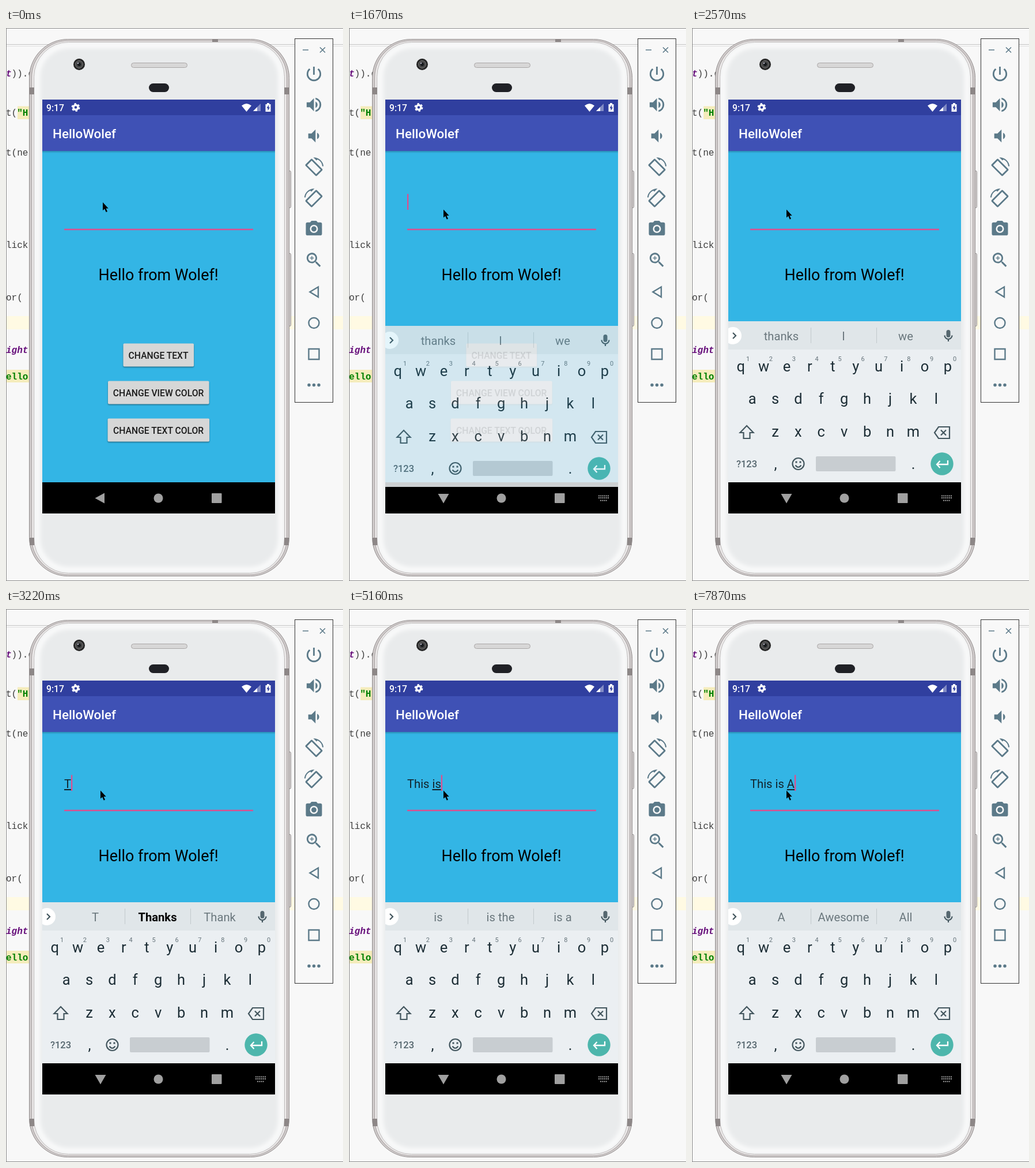
An HTML page for the animation above (8000 ms loop, 585 by 958 pixels).

```html
<!DOCTYPE html>
<html lang="en">
<head>
<meta charset="utf-8">
<style>
  html, body { margin: 0; width: 100%; height: 100%; overflow: hidden; background: #f8f8f8; }
  svg { display: block; }
  text { font-family: Roboto, sans-serif; white-space: pre; }
  .mid { text-anchor: middle; }
  .code text { font: 16px "Liberation Mono", monospace; fill: #3c3c3c; }
  .code .var { font-style: italic; font-weight: bold; fill: #660e7a; }
  .code .str { font-weight: bold; fill: #008000; }
  .caps { font-size: 15.7px; font-weight: 500; fill: #1b1b1b; }
  .key { font-size: 25.5px; fill: #1c2d35; }
  .hint { font-size: 11px; fill: #65737a; }
  .pick { font-size: 20.2px; fill: #6a777d; }
  .pick.best { font-weight: bold; fill: #000; }
  .line { fill: none; stroke: #5c7a89; stroke-width: 2.4; }
  .keyline { fill: none; stroke: #44575f; stroke-width: 2.2; }
  #word { text-decoration: underline; text-decoration-thickness: 1px; text-underline-offset: 2px; }
</style>
</head>
<body>
<svg width="585" height="958" viewBox="0 0 585 958">
  <defs>
    <filter id="glow"><feGaussianBlur stdDeviation="4"/></filter>
    <filter id="soft" x="-10%" y="-10%" width="120%" height="140%"><feGaussianBlur stdDeviation="1.2"/></filter>
    <linearGradient id="shade" x2="0" y2="1">
      <stop stop-opacity=".22"/><stop offset="1" stop-opacity="0"/>
    </linearGradient>
    <clipPath id="screen"><rect x="63" y="124" width="404" height="717"/></clipPath>
  </defs>

  <!-- editor behind the phone -->
  <path d="M0 28.5H585" stroke="#c4c4c4"/>
  <path d="M0 31.5H585" stroke="#e0e0e0"/>
  <path d="M1 499H585V522H1z" fill="#fffae3"/>
  <path d="M20 135.500H45V158H20zM1 592H45V614H1z" fill="#f5ecbb"/>
  <path d="M0 .5H585M.5 0V958M0 957.5H585" stroke="#8c8c8c"/>
  <g class="code">
    <text y="84"><tspan class="var">t</tspan>)).c</text>
    <text y="152">t(<tspan class="str">"H</tspan></text>
    <text y="221">t(ne</text>
    <text y="381">lick</text>
    <text y="472">or(</text>
    <text y="563" class="var">ight</text>
    <text y="609" class="str">ello</text>
  </g>

  <!-- phone -->
  <g fill="#d9d5d5" stroke="#8f8a8a">
    <rect x="489.500" y="247.500" width="5" height="64" rx="2"/>
    <rect x="489.500" y="390.500" width="5" height="126" rx="2"/>
    <rect x="40.500" y="19.500" width="451" height="930" rx="67" fill="#cfcaca"/>
    <rect x="44.500" y="22" width="443" height="925" rx="64" fill="#e8e5e5" stroke="#aaa4a4" stroke-width="1.500"/>
    <rect x="48.500" y="24.500" width="435" height="920" rx="60" fill="#e9ebec" stroke="#989292"/>
  </g>
  <rect x="54" y="30" width="424" height="909" rx="55" fill="none" stroke="#fff" stroke-width="8" filter="url(#glow)"/>
  <path d="M41 103h8v12h-8zM483 103h8v12h-8zM41 883h8v13h-8zM483 883h8v13h-8zM358 19h10v5h-10z" fill="#8d8787"/>
  <circle cx="127" cy="63" r="10" fill="#252525"/>
  <circle cx="127" cy="63" r="6.500" fill="#454545" stroke="#777"/>
  <circle cx="127" cy="63" r="3" fill="#15181b"/>
  <circle cx="125" cy="61" r="1.300" fill="#aab"/>
  <rect x="217.500" y="60.500" width="97" height="8" rx="4" fill="#d8d7d7" stroke="#aaa7a7"/>
  <rect x="248" y="96" width="35" height="15" rx="7.500" fill="#202126"/>

  <g clip-path="url(#screen)">
    <path d="M63 213H467V787H63z" fill="#33b5e5"/>
    <path d="M63 213H467V217H63z" fill="url(#shade)"/>
    <path d="M63 124H467V151H63z" fill="#303f9f"/>
    <path d="M63 151H467V213H63z" fill="#3f51b5"/>
    <path d="M63 787H467V841H63z"/>
    <g fill="#fff">
      <text x="70" y="143.500" font-size="15.700" font-weight="500">9:17</text>
      <circle cx="121" cy="137.500" r="4" fill="none" stroke="#fff" stroke-width="3.400"/>
      <circle cx="121" cy="137.500" r="6.200" fill="none" stroke="#fff" stroke-width="2.400" stroke-dasharray="3.250"/>
      <path d="M409 134.500Q417.500 127.500 426 134.500L417.500 145z"/>
      <path d="M442 131V144H429z" opacity=".4"/>
      <path d="M436 137V144H429z"/>
      <path d="M450.500 132H453V130H457V132H459.500V145H450.500z"/>
      <path d="M456 133L452.500 139H454.500V143.500L458 137.500H456z" fill="#303f9f"/>
      <text x="81" y="191" font-size="22.400" font-weight="500">HelloWolef</text>
    </g>
    <path d="M101 347.700H429V350.200H101z" fill="#dc508f"/>
    <text x="101" y="310" font-size="20.200" fill="#12232b" id="entry"><tspan id="done"></tspan><tspan id="word"></tspan></text>
    <rect id="caret" y="287.500" width="2.200" height="27.500" fill="#e34c8b"/>
    <text x="160.500" y="437" font-size="26.900">Hello from Wolef!</text>
    <g id="buttons"></g>
    <g id="keyboard">
      <path d="M63 508H467V787H63z" fill="#ebeff2"/>
      <path d="M63 508H467V557H63z" fill="#e0e6e9"/>
      <circle cx="71" cy="533" r="15" fill="#fff"/>
      <path class="keyline" d="M71 528L76 533L71 538"/>
      <path d="M206.500 519V546M320.500 519V546" stroke="#c2cacd"/>
      <rect x="441.500" y="523" width="7" height="13" rx="3.500" fill="#55676f"/>
      <path class="keyline" d="M438.500 532.500a6.500 6.500 0 0 0 13 0M445 539V543"/>
      <g id="picks"></g>
      <g id="keys"></g>
      <path class="keyline" d="M95 689L106.500 701H100.500V711H89.500V701H83.500z"/>
      <path class="keyline" d="M428 691H447V711H428L421 701zM432 696.500L441 705.500M441 696.500L432 705.500"/>
      <text class="mid" x="95" y="761" font-size="16.500" font-weight="500" fill="#55666e">?123</text>
      <circle class="keyline" cx="184.500" cy="755" r="10"/>
      <path class="keyline" d="M179.500 757.500Q184.500 764 189.500 757.500"/>
      <path d="M179.500 750.500h3v3h-3zM186.500 750.500h3v3h-3z" fill="#44575f"/>
      <rect x="215" y="742" width="138.500" height="26" rx="2" fill="#c8cdd1"/>
      <circle cx="434" cy="755" r="19.700" fill="#4db6ac"/>
      <path d="M444 749V756H425M430.500 750L425 756L430.500 762" fill="none" stroke="#fff" stroke-width="2.300"/>
    </g>
    <g fill="#a0a0a0">
      <path id="back"/>
      <circle cx="264.500" cy="814.500" r="8"/>
      <rect x="357" y="806" width="17.500" height="17" rx="1"/>
      <path id="dots" d="M433 810.500H451M433 814H451M436 818.500H448" stroke="#a0a0a0" stroke-width="2" stroke-dasharray="2 1.200"/>
    </g>
  </g>

  <!-- emulator tool bar -->
  <rect x="501.500" y="18.500" width="66" height="630" fill="#f8f8f8" stroke="#333"/>
  <path class="line" d="M515 38H525M545 33.500L554 42.500M554 33.500L545 42.500" style="stroke-width:1.6"/>
  <g id="tools" fill="#5c7a89"></g>
  <use href="#turn" transform="matrix(-1 0 0 1 1069 54)" fill="#5c7a89"/>
  <g class="line">
    <path d="M542 448.500V466L527.500 457.200z"/>
    <circle cx="534.500" cy="511" r="9"/>
    <path d="M525.500 556H543.500V574H525.500z"/>
  </g>
  <path d="M526 618.500h.01M534.500 618.500h.01M543 618.500h.01" stroke="#5c7a89" stroke-width="5.500" stroke-linecap="round"/>

  <path id="mouse" d="M0 0V14L3.200 11.200L5.700 17L8 16L5.500 10.400H9.700z"/>
</svg>
<script>
const $ = id => document.getElementById(id);
const label = (cls, x, y, s) => `<text class="mid ${cls}" x="${x}" y="${y}">${s}</text>`;

$('buttons').innerHTML = [['CHANGE TEXT', 203.5, 546.5], ['CHANGE VIEW COLOR', 177, 611.5], ['CHANGE TEXT COLOR', 176.5, 676.5]]
  .map(([name, x, y]) => {
    const box = `x="${x}" width="${2 * (264.8 - x)}" height="40" rx="2"`;
    return `<rect ${box} y="${y + 1.5}" opacity=".4" filter="url(#soft)"/>
      <rect ${box} y="${y}" fill="#d6d7d7"/>` + label('caps', 264.6, y + 26, name);
  }).join('');

const row = (chars, x, y) => [...chars].map((c, i) => label('key', x + i * 39.9, y, c)).join('');
$('keys').innerHTML = row('qwertyuiop', 84.7, 595) + row('asdfghjkl', 104.6, 651) + row('zxcvbnm', 144.5, 708)
  + label('key', 145, 764, ',') + label('key', 384, 764, '.')
  + [...'1234567890'].map((c, i) => label('hint', 97 + i * 39.9, 577, c)).join('');

const icon = (y, d, id = '') =>
  `<path id="${id}" fill-rule="evenodd" transform="translate(517.7 ${y - 16.8}) scale(1.4)" d="${d}"/>`;
$('tools').innerHTML =
  icon(79.5, 'M13 3h-2v10h2zM17.8 5.2l-1.4 1.4A7 7 0 1 1 7.6 6.6L6.2 5.2a9 9 0 1 0 11.6 0z') +
  icon(133, 'M3 9v6h4l5 5V4L7 9zM16.500 12A4.5 4.5 0 0 0 14 8v8a4.5 4.5 0 0 0 2.5-4zM14 3.2v2.1a7 7 0 0 1 0 13.4v2.1a9 9 0 0 0 0-17.6z') +
  icon(187, 'M18.5 12A4.5 4.5 0 0 0 16 8v8a4.5 4.5 0 0 0 2.5-4zM5 9v6h4l5 5V4L9 9z') +
  icon(241, 'M10.2 2.2a1.5 1.5 0 0 0-2.1 0L1.800 8.500a1.500 1.500 0 0 0 0 2.100l12 12a1.500 1.500 0 0 0 2.100 0l6.300-6.300a1.500 1.500 0 0 0 0-2.100zM14.800 20.800L3.600 9.600 9.200 4 20.400 15.200zM16.500 2.500A10.500 10.500 0 0 1 22.400 11h1.500A12 12 0 0 0 12 0h-.7l3.900 3.800z', 'turn') +
  icon(348, 'M9 2L7.2 4H4a2 2 0 0 0-2 2v12a2 2 0 0 0 2 2h16a2 2 0 0 0 2-2V6a2 2 0 0 0-2-2h-3.2L15 2zM12 7a5 5 0 1 1 0 10a5 5 0 1 1 0-10zM12 8.8a3.2 3.2 0 1 0 0 6.4a3.2 3.2 0 1 0 0-6.4z') +
  icon(402, 'M15.5 14h-.8l-.3-.3a6.5 6.5 0 1 0-.7.7l.3.3v.8l5 5 1.5-1.5zM9.5 14a4.5 4.5 0 1 1 0-9a4.5 4.5 0 1 1 0 9zM12 10h-2v2H9v-2H7V9h2V7h1v2h2z');

// each step overrides parts of the state before it; "_" starts the underlined word
const steps = [
  [0, { caret: 0, mouse: [168, 302], slide: null, text: '', picks: 'thanks|I|we' }],
  [120, { caret: 1 }],
  [400, { mouse: [166, 308] }],
  [520, { caret: 0, mouse: [164, 314.5] }],
  [1670, { caret: 1, slide: 8 }],
  [1790, { slide: 0 }],
  [2570, { caret: 0 }],
  [3100, { caret: 1, text: '_T' }],
  [3220, { picks: 'T|*Thanks|Thank' }],
  [3810, { caret: 0 }],
  [4090, { caret: 1, text: '_Th', picks: 'Th|*The|That' }],
  [4210, { text: '_Thi', picks: 'Thi|*This|Think' }],
  [4330, { text: '_This', picks: 'This|Thus|This is' }],
  [4730, { text: 'This _', picks: 'was|is|morning' }],
  [5160, { text: 'This _is', picks: 'is|is the|is a' }],
  [5720, { text: 'This is _', picks: 'a|the|awesome' }],
  [6180, { caret: 0 }],
  [6430, { caret: 1, text: 'This is _A', picks: 'A|Awesome|All' }],
  [6890, { caret: 0 }],
  [7320, { caret: 1, text: 'This is _Aw', picks: 'Aw|Awesome|Awaken' }],
  [7720, { text: 'This is _A' }],
  [7870, { picks: 'A|Awesome|All' }],
];

function draw(now) {
  const t = now % 8000;
  const s = Object.assign({}, ...steps.filter(([at]) => at <= t).map(step => step[1]));
  const open = s.slide !== null;
  const [done, word = ''] = s.text.split('_');

  $('done').textContent = done;
  $('word').textContent = word;
  $('caret').setAttribute('x', 101 + (s.text ? $('entry').getComputedTextLength() : 0));
  $('caret').style.opacity = s.caret;
  $('mouse').setAttribute('transform', `translate(${s.mouse})`);

  $('keyboard').style.display = $('dots').style.display = open ? '' : 'none';
  $('keyboard').setAttribute('transform', `translate(0 ${s.slide || 0})`);
  $('keyboard').style.opacity = s.slide ? 0.87 : 1;
  $('back').setAttribute('d', open ? 'M154.500 807H173.500L164 823.500z' : 'M171 805.500V823.500L154.500 814.500z');
  $('picks').innerHTML = s.picks.split('|').map((p, i) =>
    label(p[0] === '*' ? 'pick best' : 'pick', 155 + i * 108, 541, p.replace('*', ''))).join('');
  requestAnimationFrame(draw);
}
draw(performance.now());
</script>
</body>
</html>
```
